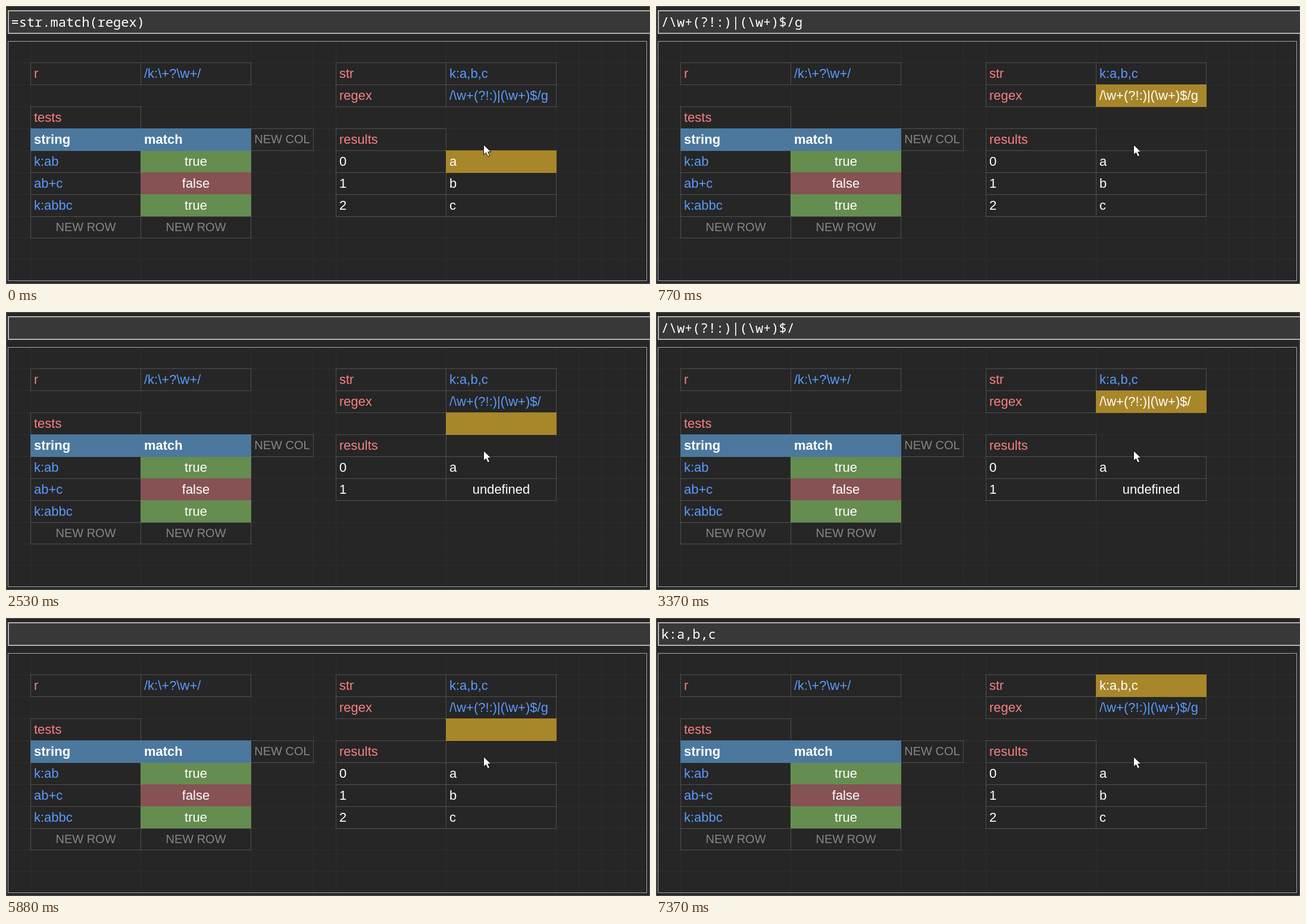
Write an HTML page with a canvas that moves like this. It is 1082 px wide and 468 px high and loops after 8 s.

```html
<!DOCTYPE html>
<html lang="en">
<head>
<meta charset="utf-8">
<title>Regex sheet</title>
<style>
html, body { margin: 0; width: 100%; height: 100%; overflow: hidden; background: #262626; }
canvas { display: block; }
</style>
</head>
<body>
<canvas id="stage" width="1082" height="468"></canvas>
<script>
const ctx = document.getElementById('stage').getContext('2d');
const LOOP = 8000;
const SANS = '"Liberation Sans", Arial, sans-serif';
const MONO = '"Noto Sans Mono", Consolas, monospace';
const WHITE = '#fff', LABEL = '#fa8080', VALUE = '#5a9bff', HINT = '#868686';
const GOLD = '#a8862a', GREEN = '#658d50', RED = '#865254', HEAD = '#4c789e';
const COLS = [41, 226, 411, 516, 554, 739, 924, 962, 1000, 1038];
const ROWS = [95, 132, 169, 206, 243, 280, 317, 354, 390, 426];
const SHORT = '/\\w+(?!:)|(\\w+)$/', FULL = SHORT + 'g';

// [start ms, selected row of the value column]
const SELECTION = [[0, 4], [500, 3], [630, 2], [770, 1], [2530, 2], [3370, 1], [5880, 2], [7220, 1], [7370, 0]];
// [start ms, formula being edited (null when idle), caret shown]
const EDITS = [[0, null], [1370, FULL, true], [1670, SHORT, true], [1950, SHORT, false],
  [2380, SHORT, true], [2530, null], [4640, SHORT, true], [5200, FULL, true], [5880, null]];

const at = (steps, t) => steps.filter(step => step[0] <= t).pop();

function rect(color, x, y, w, h) {
  ctx.fillStyle = color;
  ctx.fillRect(x, y, w, h);
}

function frame(color, x, y, w, h) {
  ctx.strokeStyle = color;
  ctx.strokeRect(x + .5, y + .5, w, h);
}

function cell(col, row, text, color, { fill, center, bold, hint } = {}) {
  const x = COLS[col], y = ROWS[row];
  const w = COLS[col + 1] - x, h = ROWS[row + 1] - y;
  if (fill) rect(fill, x, y, w + 1, h + 1);
  else frame('#505050', x, y, w, h);
  ctx.font = `${bold ? 'bold ' : ''}${hint ? 20 : 22}px ${SANS}`;
  ctx.textAlign = center || hint ? 'center' : 'left';
  ctx.fillStyle = color;
  ctx.fillText(text, center || hint ? x + w / 2 + .5 : x + 6, y + (hint ? 25 : 26));
}

function drawGrid() {
  rect('#262626', 0, 0, 1082, 468);
  frame('#5c5c5c', 0, 0, 1081, 467);
  ctx.strokeStyle = '#353535';
  ctx.setLineDash([1, 1]);
  ctx.beginPath();
  for (const x of COLS) { ctx.moveTo(x + .5, 60); ctx.lineTo(x + .5, 462); }
  for (const y of ROWS) { ctx.moveTo(4, y + .5); ctx.lineTo(1076, y + .5); }
  ctx.stroke();
  ctx.setLineDash([]);
  frame('#a6a6a6', 3, 59, 1073, 403);
}

function drawBar(text, editing, caret) {
  const border = editing ? '#a2a2a2' : '#b0b0b0';
  rect(border, 3, 7, 1079, 40);
  rect('#383838', 5, 9, 1077, 36);
  if (editing) rect('#5596ff', 3, 45, 1079, 2.5);
  ctx.font = `22px ${MONO}`;
  ctx.textAlign = 'left';
  ctx.fillStyle = WHITE;
  ctx.fillText(text, 8.5, 35);
  if (caret) rect(WHITE, Math.floor(8 + text.length * 13.2), 13, 2, 28);
}

function drawTests() {
  cell(0, 0, 'r', LABEL);
  cell(1, 0, '/k:\\+?\\w+/', VALUE);
  cell(0, 2, 'tests', LABEL);
  cell(2, 3, 'NEW COL', HINT, { hint: true });
  ['k:ab', 'ab+c', 'k:abbc'].forEach((text, i) => {
    const ok = i !== 1;
    cell(0, 4 + i, text, VALUE);
    cell(1, 4 + i, String(ok), WHITE, { fill: ok ? GREEN : RED, center: true });
  });
  cell(0, 7, 'NEW ROW', HINT, { hint: true });
  cell(1, 7, 'NEW ROW', HINT, { hint: true });
  cell(0, 3, 'string', WHITE, { fill: HEAD, bold: true });
  cell(1, 3, 'match', WHITE, { fill: HEAD, bold: true });
}

function drawResults(regex, selected) {
  const results = regex === FULL ? ['a', 'b', 'c'] : ['a', 'undefined'];
  const values = ['k:a,b,c', regex, '', ''];
  cell(4, 0, 'str', LABEL);
  cell(4, 1, 'regex', LABEL);
  cell(4, 3, 'results', LABEL);
  cell(5, 0, values[0], VALUE);
  cell(5, 1, values[1], VALUE);
  results.forEach((text, i) => {
    cell(4, 4 + i, String(i), WHITE);
    cell(5, 4 + i, text, WHITE, { center: text === 'undefined' });
  });
  cell(5, selected, [...values, ...results][selected], WHITE, { fill: GOLD });
  return values[selected] ?? '=str.match(regex)';
}

function drawPointer() {
  const arrow = new Path2D('M802.5 233.5v17l4-3.6 2.9 6.5 3.2-1.4-2.9-6.3h5.3z');
  ctx.fillStyle = WHITE;
  ctx.fill(arrow);
  ctx.strokeStyle = '#111';
  ctx.stroke(arrow);
}

function render(now) {
  const t = now % LOOP;
  const [, edit, caret] = at(EDITS, t);
  const regex = t >= 2530 && t < 5880 ? SHORT : FULL;
  drawGrid();
  drawTests();
  const content = drawResults(regex, at(SELECTION, t)[1]);
  drawBar(edit ?? content, edit !== null, caret);
  drawPointer();
}

const start = performance.now();
function tick() {
  render(performance.now() - start);
  requestAnimationFrame(tick);
}
tick();
</script>
</body>
</html>
```
